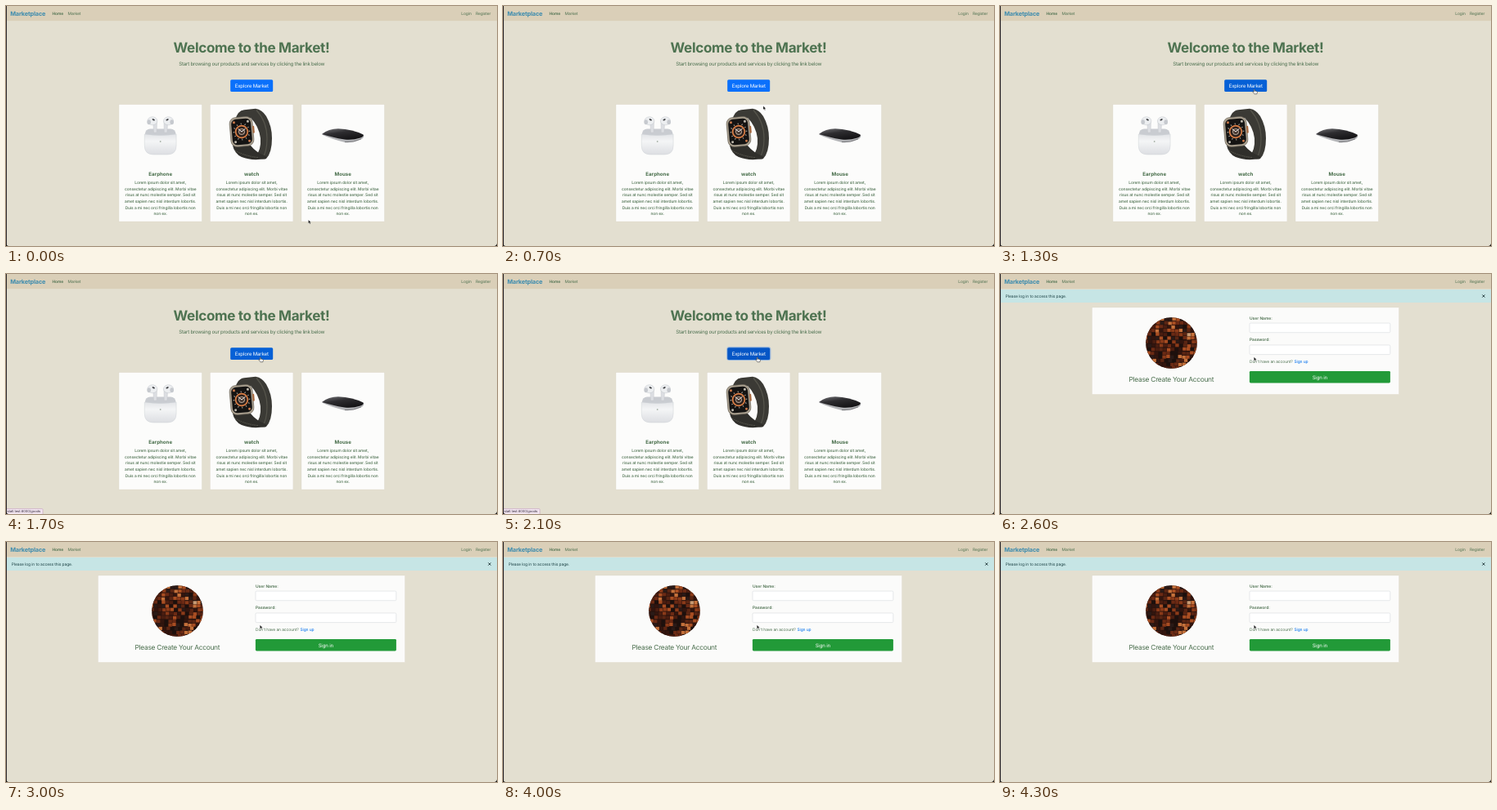
These frames come from a looping animation (600 by 294 pixels, 4.5 s). An HTML page:

```html
<!DOCTYPE html>
<html lang="en">
<head>
<meta charset="utf-8">
<title>Market walkthrough</title>
<style>
  html, body { margin: 0; width: 100%; height: 100%; overflow: hidden; background: #e3dfd0; }
  svg { display: block; width: 600px; height: 294px; }
  text {
    font-family: Inter, "Open Sans", sans-serif;
    font-size: 4.92px;
    font-optical-sizing: none;
    letter-spacing: -.017em;
    text-rendering: geometricPrecision;
    fill: #4b6f4e;
    white-space: pre;
  }
  .mid { text-anchor: middle; }
  .bold { font-weight: 600; }
  .brand { font-size: 7.3px; font-weight: 700; letter-spacing: -.02em; fill: #3d8cae; }
  .hero { font-size: 17.1px; font-weight: 700; letter-spacing: -.021em; fill: #4e7351; }
  .lead { font-size: 6.14px; letter-spacing: -.039em; }
  .body { font-weight: 500; }
  .btn { font-size: 6.14px; letter-spacing: -.03em; fill: #fff; }
  .name { font-size: 6.14px; font-weight: 700; letter-spacing: 0; fill: #446b47; }
  .title { font-size: 8.4px; letter-spacing: -.033em; }
  .label { font-weight: 600; letter-spacing: 0; }
  .note { fill: #1c4245; }
  .link { fill: #1279ee; font-weight: 500; }
  .status { font-size: 4.04px; letter-spacing: 0; fill: #33283a; }
</style>
</head>
<body>
<svg viewBox="0 0 600 294">
  <defs>
    <linearGradient id="shell" x2="0" y2="1">
      <stop offset="0" stop-color="#e3e5e8"/><stop offset=".35" stop-color="#f4f5f6"/><stop offset="1" stop-color="#dcdee2"/>
    </linearGradient>
    <linearGradient id="gloss" x2=".6" y2="1">
      <stop offset="0" stop-color="#77777a"/><stop offset=".45" stop-color="#2e2d30"/><stop offset="1" stop-color="#151416"/>
    </linearGradient>
    <clipPath id="round"><circle cx="209.5" cy="84.5" r="31.3"/></clipPath>
  </defs>
  <rect width="600" height="294" fill="#e3dfd0"/>
  <g id="nav"></g>
  <g id="home"></g>
  <g id="login"></g>
  <g id="status"></g>
  <path d="M0 0H1V294H0Z" fill="#2c282c"/>
  <path d="M0 294V290.5Q.3 293.7 3.5 294ZM600 294V290.5Q599.7 293.7 596.5 294Z" fill="#111"/>
  <path id="arrow" d="M0 0V4.5L1.1 3.5L1.9 5.2L2.7 4.8L1.9 3.2H3.3Z" fill="#0b0b0b" stroke="#fff" stroke-width=".3"/>
  <path id="hand" d="M0 .5Q.6-.3 1.1.5V2.3L3.6 2.8Q4.2 3 4.1 3.7L3.6 6H.6L-1.3 3.6Q-1.3 2.7-.5 3L0 3.5Z" fill="#fff" stroke="#161616" stroke-width=".5" stroke-linejoin="round"/>
</svg>
<script>
const $ = id => document.getElementById(id);
const text = (x, y, s, cls = '') => `<text x="${x}" y="${y}" class="${cls}">${s}</text>`;
const rect = (x, y, w, h, fill, extra = '') =>
  `<rect x="${x}" y="${y}" width="${w}" height="${h}" fill="${fill}" ${extra}/>`;
const oval = (x, y, rx, ry, fill, extra = '') =>
  `<ellipse cx="${x}" cy="${y}" rx="${rx}" ry="${ry}" fill="${fill}" ${extra}/>`;
const path = (d, fill, extra = '') => `<path d="${d}" fill="${fill}" ${extra}/>`;

function random(seed) {
  return () => (seed = (seed * 16807) % 2147483647) / 2147483647;
}

const bud = flip => `<g transform="translate(188.7 0) scale(${flip} 1)">
  ${path('M-9 141L-4.2 140.5L-4.6 155H-8.2Z', '#dcdee2', 'stroke="#bfc2c7" stroke-width=".4"')}
  ${oval(-9.8, 140.8, 6, 5, '#eceef0', 'stroke="#c3c6cb" stroke-width=".5"')}
  ${oval(-14, 142.2, 2.3, 3, '#c6c9ce')}
  ${oval(-8.4, 139.3, 1.8, 1, '#3f4044', 'transform="rotate(25 -8.4 139.3)"')}</g>`;

const earphone = () =>
  rect(170, 150.5, 37.4, 14, '#c9ccd1', 'rx="6"') + bud(1) + bud(-1) +
  path('M169.3 157Q188.7 160 208.1 157V171Q208.1 182 197 182H180.4Q169.3 182 169.3 171Z', 'url(#shell)', 'stroke="#cfd2d6" stroke-width=".5"') +
  oval(188.7, 166, .9, .9, '#a9b3a9');

function watch() {
  let ticks = '';
  for (let a = 0; a < 360; a += 30)
    ticks += rect(-.4, -10.5, .8, 1.8, '#ddd5c8', `transform="rotate(${a})"`);
  return path('M280 140Q283 128 291 127.3L305 125.8Q313 127 318 135Q325 147 325 162Q325 180 318 187Q312 189 305 184Q312 176 311 162Q309 147 299 137Z', '#3b3a35') +
    path('M306 127.5Q319 142 319 162Q319 179 313 187', 'none', 'stroke="#55544b" stroke-width="1.2"') +
    path('M276.5 169L299 171Q306 180 318 184V187Q300 190 288 185Q279 181 276.5 169Z', '#302f2b') +
    path('M280 177Q292 184 308 185.5', 'none', 'stroke="#69675b" stroke-width=".8" stroke-dasharray="1.5 1"') +
    `<g transform="translate(288 154) rotate(-5)">
      ${rect(-14, -18, 28, 36, '#aaa08f', 'rx="7.5" stroke="#6f685d" stroke-width=".7"')}
      ${rect(13.5, -6, 2.2, 9, '#a8693f', 'rx="1"')}
      ${rect(-12, -15.8, 24, 31.6, '#151413', 'rx="6"')}
      ${ticks}
      ${oval(0, 0, 7.4, 7.4, '#2c211d', 'stroke="#dd8047" stroke-width="1.7"')}
      ${oval(0, 0, 3.6, 3.6, '#4a3a32', 'stroke="#d6c6b4" stroke-width=".8"')}
      ${path('M0 0L-4-4M0 0L5-3.5', 'none', 'stroke="#fff" stroke-width=".9"')}
      ${oval(-8.5, -12, 1.5, 1.5, '#c9784a')}${oval(8.5, -12, 1.5, 1.5, '#bfb9ad')}
      ${oval(-8.5, 12, 1.5, 1.5, '#bfb9ad')}${oval(8.5, 12, 1.5, 1.5, '#c9784a')}</g>`;
}

const mouse = () =>
  path('M386 157.5Q396 154 437 158Q438.5 161 433 163.8Q424 168 414 167Q398 163 386 157.5Z', '#b3b4b7') +
  path('M386 157Q394 150.2 406 150.2Q424 151 436.5 157.5Q438 159.5 433 161.5Q424 164.6 414 163.6Q398 160.8 386 157Z', 'url(#gloss)') +
  path('M414 166.6Q425 167.4 434 162.8', 'none', 'stroke="#5b5b5e" stroke-width=".7"');

const blurb = ['Lorem ipsum dolor sit amet,', 'consectetur adipiscing elit. Morbi vitae',
  'risus at nunc molestie semper. Sed sit', 'amet sapien nec nisl interdum lobortis.',
  'Duis a mi nec orci fringilla lobortis non', 'non ex.'];

const card = (x, name, art) =>
  rect(x, 120.7, 101.4, 143.3, '#fcfcfb', 'stroke="#d9d3c7" stroke-width=".3"') + art() +
  text(x + 50.7, 207.5, name, 'name mid') +
  blurb.map((s, i) => text(x + 50.7, 218.2 + i * 7.6, s, 'body mid')).join('');

function mosaic() {
  const rnd = random(4127);
  const tones = ['#1c100d', '#32150e', '#4a1d10', '#6b2a14', '#8a3a19', '#a84d22', '#c4703a', '#2a1a17', '#5a2513', '#c79a73'];
  let out = rect(178, 53, 64, 64, '#27120d');
  for (let y = 53; y < 117; y += 4.6)
    for (let x = 177 - rnd() * 3; x < 242; x += 4.8) {
      const tone = tones[Math.floor(rnd() * (rnd() < .2 ? 10 : 9))];
      out += rect(x.toFixed(1), (y + rnd()).toFixed(1), 4.4, 4, tone);
    }
  return `<g clip-path="url(#round)">${out}</g>`;
}

const field = (y, label) => text(305, y, label, 'label') +
  rect(305, y + 4.6, 171.8, 11.6, '#fff', 'rx="1.2" stroke="#cfd3d6" stroke-width=".5"');

$('nav').innerHTML = rect(0, 0, 600, 18.2, '#dacfb8') +
  text(5.2, 11.7, 'Marketplace', 'brand') + text(56.5, 11.2, 'Home', 'bold') +
  text(75.6, 11.2, 'Market') + text(556.3, 11.2, 'Login') + text(573.9, 11.2, 'Register');

$('home').innerHTML = text(300, 57.1, 'Welcome to the Market!', 'hero mid') +
  text(300.3, 73, 'Start browsing our products and services by clicking the link below', 'lead mid') +
  rect(273.8, 89.7, 53, 15.8, 'none', 'rx="2" stroke="#8fb3e0" stroke-width="1" id="ring"') +
  rect(274.2, 90.2, 52, 14.8, '#0a70fb', 'rx="1.6" id="explore"') +
  text(300.2, 99.9, 'Explore Market', 'btn mid') +
  card(138, 'Earphone', earphone) + card(249.5, 'watch', watch) + card(361, 'Mouse', mouse);

$('login').innerHTML = rect(0, 19, 600, 16, '#c6e5e5') +
  text(6.8, 28.7, 'Please log in to access this page.', 'note') +
  path('M589.3 25.4L592.5 28.6M592.5 25.4L589.3 28.6', 'none', 'stroke="#1d3537" stroke-width=".9"') +
  rect(112.5, 41, 375, 106.4, '#fbfbfa', 'stroke="#d9d3c7" stroke-width=".3"') + mosaic() +
  text(209.4, 131.6, 'Please Create Your Account', 'title mid') +
  field(55.5, 'User Name:') + field(82.4, 'Password:') +
  text(305, 109.2, "Don't have an account?") + text(359.4, 109.2, 'Sign up', 'link') +
  rect(304.9, 118.9, 172, 14.6, '#229a38', 'rx="1.4"') + text(390.8, 128.5, 'Sign in', 'btn mid');

$('status').innerHTML = rect(-1, 287.6, 46, 8, '#f1e5ef', 'rx="1" stroke="#b98fb3" stroke-width=".5"') +
  text(1.6, 292.3, 'stall.test:8000/goods', 'status');

const LOOP = 4500, STEP = 100;
const HOVER = 900, STATUS_ON = 1500, PRESS = 1900, SUBMIT = 2200, STATUS_OFF = 2500;
// time, x, y of the pointer tip
const moves = [[0, 369.5, 262], [100, 368, 255], [300, 350, 208], [500, 328, 146],
  [700, 318, 122.5], [900, 310.3, 101.8], [LOOP, 310.3, 101.8]];

function pointer(t) {
  const i = moves.findIndex(m => m[0] > t);
  const [a, b] = [moves[i - 1], moves[i]];
  const k = (t - a[0]) / (b[0] - a[0]);
  return [a[1] + (b[1] - a[1]) * k, a[2] + (b[2] - a[2]) * k];
}

const show = (id, on) => $(id).setAttribute('display', on ? 'inline' : 'none');
const start = performance.now();

function draw() {
  const now = Math.max(0, performance.now() - start) % LOOP;
  const t = Math.floor(now / STEP) * STEP;
  const [x, y] = pointer(t);
  const over = t >= HOVER && t < STATUS_OFF;
  const pressed = t >= PRESS;
  show('home', t < SUBMIT);
  show('login', t >= SUBMIT);
  show('status', t >= STATUS_ON && t < STATUS_OFF);
  show('ring', pressed);
  show('hand', over);
  show('arrow', !over);
  for (const id of ['hand', 'arrow']) $(id).setAttribute('transform', `translate(${x} ${y})`);
  $('explore').setAttribute('fill', pressed ? '#0556c6' : t >= HOVER ? '#0560d6' : '#0a70fb');
  requestAnimationFrame(draw);
}
draw();
</script>
</body>
</html>
```
